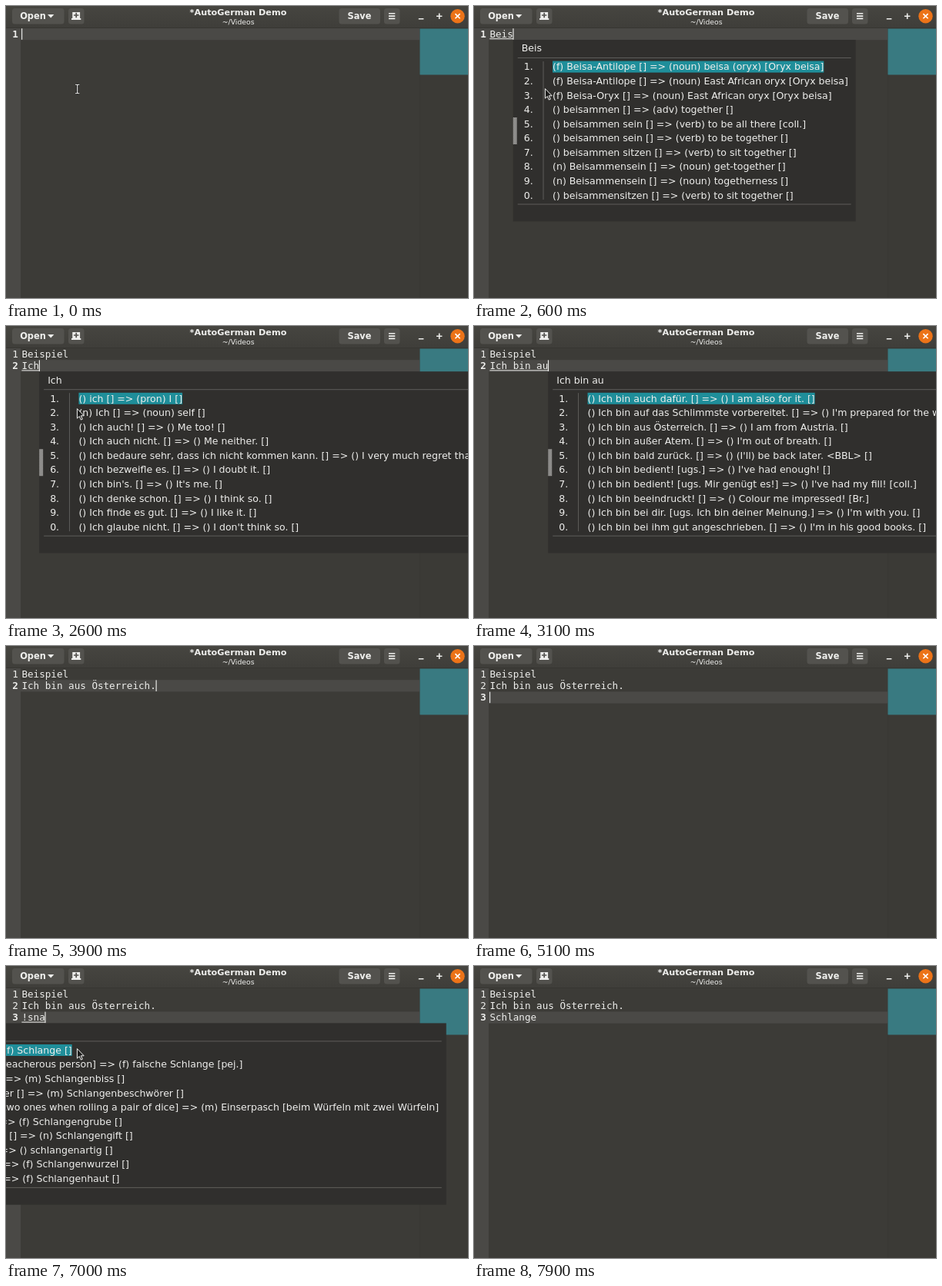
These frames come from a looping animation (600x380 px, 8000 ms). An HTML page:

```html
<!DOCTYPE html>
<html lang="en">
<head>
<meta charset="utf-8">
<title>Text editor demo</title>
<style>
html, body { margin: 0; width: 600px; height: 380px; overflow: hidden; background: #3c3b37; }
svg { display: block; }
text { font: 12.56px "DejaVu Sans", sans-serif; fill: #eeeeec; white-space: pre; }
.mono { font-family: "DejaVu Sans Mono", monospace; font-size: 12.6px; }
.bold { font-weight: bold; }
.bar { font-size: 11.4px; font-weight: bold; }
.mid { text-anchor: middle; }
.end { text-anchor: end; }
</style>
</head>
<body>
<svg width="600" height="380" viewBox="0 0 600 380">
  <defs>
    <linearGradient id="head" x2="0" y2="1"><stop stop-color="#464540"/><stop offset="1" stop-color="#3f3e3a"/></linearGradient>
    <pattern id="grip" width="2" height="2" patternUnits="userSpaceOnUse">
      <path d="M0 0h2v2h-2z" fill="#777674"/><path d="M0 0h1v1h-1zM1 1h1v1h-1z" fill="#a3a2a0"/>
    </pattern>
  </defs>
  <path d="M0 0h600v380H0z" fill="#3c3b37"/>
  <path d="M0 28h19v352H0z" fill="#4a4946"/>
  <rect id="line" x="19" width="518" height="15.2" fill="#4a4946"/>
  <path d="M537 89h63v291h-63z" fill="#3b3a36"/>
  <path d="M537.5 89v291" stroke="#383733"/>
  <path d="M537.5 29.5h62.5v60h-62.5z" fill="#397a81"/>
  <g id="doc"></g>
  <rect id="caret" width="1.1" height="14.6" fill="#f4f4f2"/>

  <path d="M0 0h600v28H0z" fill="url(#head)"/>
  <path d="M0 28.5h600" stroke="#373632"/>
  <g fill="#53524e">
    <rect x="8" y="3" width="67.5" height="20.5" rx="3.5"/>
    <rect x="81" y="3" width="20.5" height="20.5" rx="3.5"/>
    <rect x="432.5" y="3" width="53.5" height="20.5" rx="3.5"/>
    <rect x="491" y="3" width="20.5" height="20.5" rx="3.5"/>
  </g>
  <text class="bar" x="18.2" y="17">Open</text>
  <path d="M54 11h8.4l-4.2 4.4z" fill="#eeeeec"/>
  <path d="M86.3 8h9.8v8h1.2v2H85v-2h1.3z" fill="#eeeeec"/>
  <path d="M88 12h6.4M91.2 8.8v6.4" stroke="#53524e" stroke-width="1.7"/>
  <text class="bar mid" x="301.5" y="12" style="font-size:11.25px">*AutoGerman Demo</text>
  <text class="mid" x="301.7" y="23.6" style="font-size:9.3px">~/Videos</text>
  <text class="bar mid" x="459" y="17">Save</text>
  <path d="M497 9.8h8.3M497 13.1h8.3M497 16.4h8.3M535.8 16.8h6.6M559 13.2h7.4M562.7 9.5v7.4" stroke="#eeeeec" stroke-width="1.6"/>
  <circle cx="586.5" cy="13.2" r="9.2" fill="#ec7318"/>
  <path d="M583.4 10.1l6.2 6.2m0-6.2l-6.2 6.2" stroke="#fff" stroke-width="1.6"/>

  <g id="pop"></g>
  <path id="beam" d="M90 102.2h1.9l.8.8.8-.8h1.9M90 113.8h1.9l.8-.8.8.8h1.9M92.7 103v10" fill="none"/>
  <path id="arrow" d="M92.4 107.6v12.6l2.9-2.7 2 4.6 2-.9-2-4.4h3.9z" fill="#1c1c1b" stroke="#f4f4f2" stroke-width="1"/>
</svg>
<script>
const NS = 'http://www.w3.org/2000/svg', LOOP = 8000;
const LEFT = 20.4, TOP = 29, PITCH = 15.2, CHAR = 7.585;
const $ = id => document.getElementById(id);

function add(parent, tag, attrs, text) {
  const el = document.createElementNS(NS, tag);
  for (const k in attrs) el.setAttribute(k, attrs[k]);
  if (text !== undefined) el.textContent = text;
  return parent.appendChild(el);
}

// the I-beam is a white stroke over a dark one
const beam = $('beam'), glow = beam.cloneNode();
glow.removeAttribute('id');
beam.before(glow);
for (const [el, c, w] of [[glow, '#1c1c1b', 2.8], [beam, '#f4f4f2', 1.1]]) {
  el.setAttribute('stroke', c);
  el.setAttribute('stroke-width', w);
}

const rows = s => s.trim().split('\n');
const lists = {
  B: rows(`
(n) B [] => (noun) B []
(n) b [] => (noun) b []
(f) B-Ebene [] => (noun) mezzanine [level below the street]
(n) B-Dur [] => (noun) B flat major [music]
(m) B-Baum [Datenstruktur] => (noun) B-tree [self-balancing data structure]
(n) b-Moll [] => (noun) B flat minor [music]
(f) B-Probe [] => (noun) B sample []
(f) B-Seite [einer Schallplatte] => (noun) B-side [of a record]
(f) B-Ware [] => (noun) seconds []
(n) Baby [] => (noun) baby []`),
  Bei: rows(`
() bei [] => (prep) at []
() bei [] => (prep) near []
() bei Bedarf [] => (adv) if required []
() bei weitem [] => (adv) by far []
() beibehalten [] => (verb) to maintain []
() beibringen [] => (verb) to teach []
(f) Beichte [] => (noun) confession []
() beide [] => (adj) both []
(m) Beifall [] => (noun) applause []
(n) Bein [] => (noun) leg []`),
  Beis: rows(`
(f) Beisa-Antilope [] => (noun) beisa (oryx) [Oryx beisa]
(f) Beisa-Antilope [] => (noun) East African oryx [Oryx beisa]
(f) Beisa-Oryx [] => (noun) East African oryx [Oryx beisa]
() beisammen [] => (adv) together []
() beisammen sein [] => (verb) to be all there [coll.]
() beisammen sein [] => (verb) to be together []
() beisammen sitzen [] => (verb) to sit together []
(n) Beisammensein [] => (noun) get-together []
(n) Beisammensein [] => (noun) togetherness []
() beisammensitzen [] => (verb) to sit together []`),
  Beisp: rows(`
(n) Beispiel [] => (noun) example []
(n) Beispiel [] => (noun) instance []
(n) Beispiel [] => (noun) illustration []
() beispielgebend [] => (adj) exemplary []
() beispielhaft [] => (adj) exemplary []
() beispiellos [] => (adj) unprecedented []
() beispiellos [] => (adj) unparalleled []
(m) Beispielsatz [] => (noun) example sentence []
() beispielsweise [] => (adv) for example []
() beispringen [] => (verb) to come to sb.'s aid []`),
  Ich: rows(`
() ich [] => (pron) I []
(n) Ich [] => (noun) self []
() Ich auch! [] => () Me too! []
() Ich auch nicht. [] => () Me neither. []
() Ich bedaure sehr, dass ich nicht kommen kann. [] => () I very much regret that I can't come. []
() Ich bezweifle es. [] => () I doubt it. []
() Ich bin's. [] => () It's me. []
() Ich denke schon. [] => () I think so. []
() Ich finde es gut. [] => () I like it. []
() Ich glaube nicht. [] => () I don't think so. []`),
  au: rows(`
() Ich bin auch dafür. [] => () I am also for it. []
() Ich bin auf das Schlimmste vorbereitet. [] => () I'm prepared for the worst. []
() Ich bin aus Österreich. [] => () I am from Austria. []
() Ich bin außer Atem. [] => () I'm out of breath. []
() Ich bin bald zurück. [] => () (I'll) be back later. <BBL> []
() Ich bin bedient! [ugs.] => () I've had enough! []
() Ich bin bedient! [ugs. Mir genügt es!] => () I've had my fill! [coll.]
() Ich bin beeindruckt! [] => () Colour me impressed! [Br.]
() Ich bin bei dir. [ugs. Ich bin deiner Meinung.] => () I'm with you. []
() Ich bin bei ihm gut angeschrieben. [] => () I'm in his good books. []`),
  snake: rows(`
(noun) snake [] => (f) Schlange []
(noun) snake [fig.: treacherous person] => (f) falsche Schlange [pej.]
(noun) snake bite [] => (m) Schlangenbiss []
(noun) snake charmer [] => (m) Schlangenbeschwörer []
(noun) snake eyes [two ones when rolling a pair of dice] => (m) Einserpasch [beim Würfeln mit zwei Würfeln]
(noun) snake pit [] => (f) Schlangengrube []
(noun) snake venom [] => (n) Schlangengift []
(noun) snakelike [] => () schlangenartig []
(noun) snakeroot [] => (f) Schlangenwurzel []
(noun) snakeskin [] => (f) Schlangenhaut []`)
};
lists.aus = lists.au.slice(2).concat(
  '() Ich bin bereit. [] => () I\'m ready. []', '() Ich bin da. [] => () I\'m here. []');

// rows of the widest list, set by their right ends
const wide = [
  [2, 5.6, '(n) Schwefel [Symbol: S]'],
  [3, 153, '(noun) Sierra => [FUNK-Buchstabiertafel]'],
  [7, 94.4, '(noun) safety tips => [Sicherheitsratschläge]'],
  [8, 96.4, '(noun) slow-wave sleep => (m) Tiefschlaf []'],
  [9, 600.8, "marshmallow and chocolate sandwiched between two pieces of graham cracker] => (n) S'more [trad. La"]
];

// time, text ("_" starts the word being composed), list
const one = 'Beispiel\n', two = one + 'Ich bin aus Österreich.', three = two + '\n';
const steps = [
  [0, ''], [100, '_B', 'B'], [250, '_Be', 'B'], [400, '_Bei', 'Bei'], [550, '_Beis', 'Beis'],
  [750, '_Beisp', 'Beisp'], [900, '_Beispi', 'Beisp'], [1150, 'Beispiel'], [1500, one],
  [2050, one + '_I', 'Ich'], [2250, one + '_Ic', 'Ich'], [2450, one + '_Ich', 'Ich'],
  [2750, one + '_Ich ', 'Ich'], [2800, one + '_Ich b', 'Ich'], [2870, one + '_Ich bi', 'Ich'],
  [2930, one + '_Ich bin', 'au'], [2980, one + '_Ich bin ', 'au'], [3030, one + '_Ich bin a', 'au'],
  [3080, one + '_Ich bin au', 'au'], [3250, one + '_Ich bin aus', 'aus'], [3700, two], [4400, three],
  [5800, three + '_!', 'wide'], [6200, three + '_!s', 'wide'], [6750, three + '_!sn', 'snake'],
  [6950, three + '_!sna', 'snake'], [7100, three + '_!snak', 'snake'], [7300, three + '_!snake', 'snake'],
  [7550, three + 'Schlange']
];
const shown = [[150, 1150], [2100, 3700], [5850, 7550]];

// where the caret stands in a step's text
function place(text) {
  const lines = text.replace('_', '').split('\n'), n = lines.length - 1;
  return { lines, n, x: LEFT + lines[n].length * CHAR, y: TOP + n * PITCH };
}

function drawDoc(text) {
  const doc = $('doc'), { lines, n, x, y } = place(text);
  doc.replaceChildren();
  lines.forEach((s, i) => {
    const base = TOP + i * PITCH + 11.7;
    add(doc, 'text', { x: 8.2, y: base, class: i === n ? 'mono bold' : 'mono' }, i + 1);
    add(doc, 'text', { x: LEFT, y: base, class: 'mono' }, s);
  });
  if (text.includes('_'))
    add(doc, 'path', { d: `M${LEFT} ${y + 13.7}H${x}`, stroke: '#eeeeec' });
  $('line').setAttribute('y', y);
  $('caret').setAttribute('x', x - 0.3);
  $('caret').setAttribute('y', y + 0.2);
}

function drawPop([, text, key]) {
  const pop = $('pop'), at = place(text), y = at.y + 15;
  const list = lists[key];
  const x = key === 'wide' ? -420 : key === 'snake' ? -180 : at.x;
  const base = i => y + 39.4 + i * 18.57;
  pop.replaceChildren();
  const box = add(pop, 'rect', { x, y, height: 236.3, fill: '#302f2d' });
  const rules = add(pop, 'path', { stroke: '#5e5d5a', fill: 'none' });
  add(pop, 'rect', { x, y: y + 101, width: 5, height: 35, fill: 'url(#grip)' });
  add(pop, 'text', { x: x + 11, y: y + 15.4 }, text.split('_')[1]);
  let w = 1100;
  if (list) {
    const mark = add(pop, 'rect', { x: x + 51.3, y: base(0) - 11.8, height: 15, fill: '#1f8e9a' });
    const widths = list.map((s, i) => {
      add(pop, 'text', { x: x + 14, y: base(i) }, (i + 1) % 10 + '.');
      return add(pop, 'text', { x: x + 51.3, y: base(i) }, s).getComputedTextLength();
    });
    mark.setAttribute('width', widths[0]);
    w = Math.max(...widths) + 61;
  } else {
    for (const [i, end, s] of wide) add(pop, 'text', { x: end, y: base(i), class: 'end' }, s);
  }
  box.setAttribute('width', w);
  rules.setAttribute('d', `M${x + 6} ${y + 23.5}h${w - 12}M${x + 6} ${y + 214}h${w - 12}M${x + 39.3} ${y + 28}v180`);
  pop.dataset.x = x;
}

const show = (el, on) => el.setAttribute('visibility', on ? 'visible' : 'hidden');
const clamp = v => Math.max(0, Math.min(1, v));
let nowStep, popStep;

function draw(t) {
  const past = steps.filter(s => s[0] <= t);
  const step = past[past.length - 1], last = past.filter(s => s[2]).pop();
  if (step !== nowStep) drawDoc((nowStep = step)[1]);
  if (last && last !== popStep) drawPop(popStep = last);
  const alpha = Math.max(...shown.map(([a, b]) => Math.min(clamp((t - a) / 120), clamp(1 - (t - b) / 150))));
  $('pop').setAttribute('opacity', alpha);
  show($('pop'), alpha > 0);
  show($('caret'), t < 7900);
  show($('arrow'), alpha > 0 && step[2] && $('pop').dataset.x < 92);
  show(beam, t < 100);
  show(glow, t < 100);
}

const begin = performance.now();
function tick() {
  draw((performance.now() - begin) % LOOP);
  requestAnimationFrame(tick);
}
tick();
</script>
</body>
</html>
```
